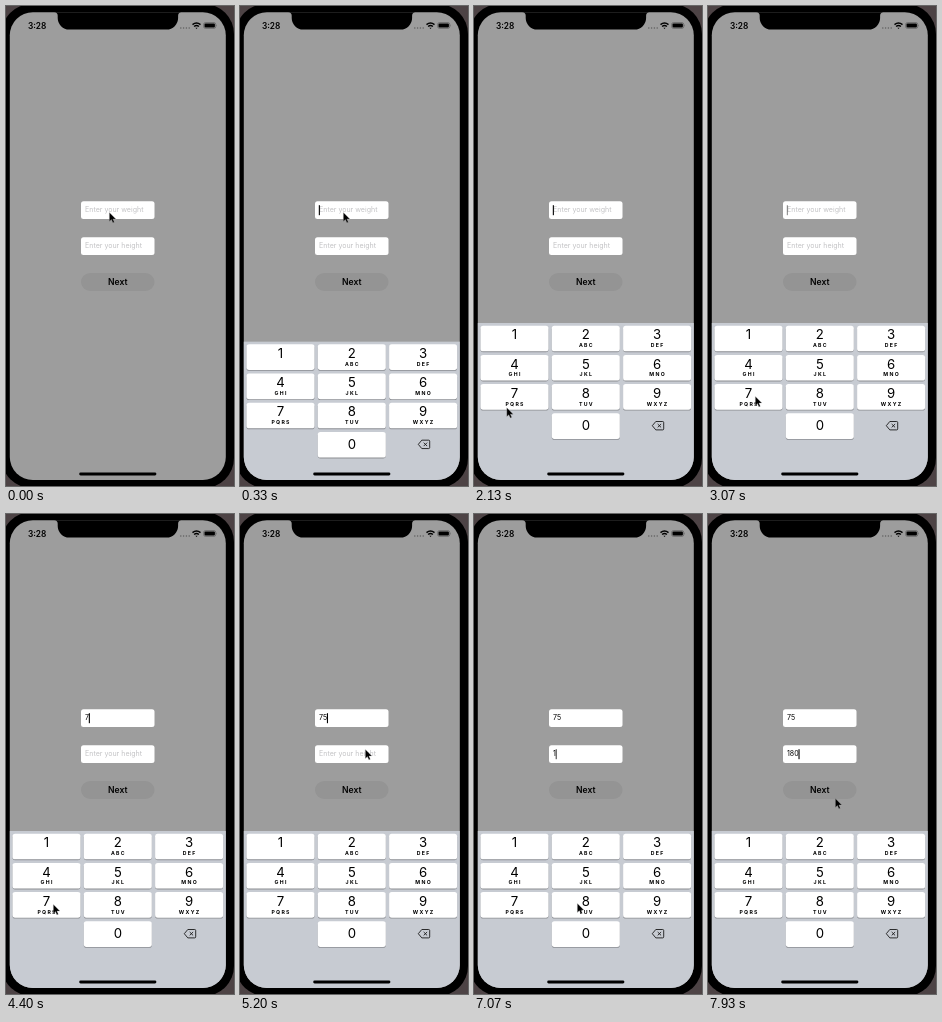
An HTML page that plays this animation: 228 px wide and 480 px high, repeating every 8 s.

```html
<!DOCTYPE html>
<html lang="en">
<head>
<meta charset="utf-8">
<style>
html, body { margin: 0; width: 100%; height: 100%; overflow: hidden; background: #4d4345; }
svg { display: block; width: 228px; height: 480px; font-family: Inter, Roboto, sans-serif; }
.hint { fill: #c3c3c5; }
</style>
</head>
<body>
<svg viewBox="0 0 228 480">
  <defs>
    <clipPath id="screen"><rect x="3.8" y="6.3" width="216" height="467.7" rx="23"/></clipPath>
  </defs>
  <rect x="-4.4" y="-2" width="232.4" height="484" rx="30"/>
  <g clip-path="url(#screen)">
    <rect width="228" height="480" fill="#9d9d9d"/>
    <g id="form" font-size="7.05"></g>
    <rect x="75" y="267" width="73.5" height="18" rx="9" fill="#949494"/>
    <text x="111.8" y="279.1" font-size="8.6" font-weight="600" text-anchor="middle">Next</text>
    <g id="keyboard">
      <rect y="317" width="228" height="165" fill="#c7cbd2"/>
      <g id="keys" text-anchor="middle"></g>
      <path d="M178.3 419.7l3.5-4.2h6.9q1 0 1 1v6.400q0 1-1 1h-6.900zM183.700 418l3.400 3.400m0-3.400l-3.400 3.400" fill="none" stroke="#111" stroke-width=".85" stroke-linejoin="round"/>
    </g>
    <rect x="73.200" y="466.500" width="77.200" height="2.900" rx="1.450"/>
  </g>
  <path d="M48.200 6.300a3.500 3.500 0 0 1 3.500 3.500v2.300a11.500 11.500 0 0 0 11.500 11.500h97.400a11.500 11.500 0 0 0 11.500-11.500v-2.300a3.500 3.500 0 0 1 3.500-3.500z"/>
  <text x="21.900" y="22.600" font-size="8.300" font-weight="600">3:28</text>
  <path d="M174.800 22h10" stroke="#222" stroke-width="1.500" stroke-linecap="round" stroke-dasharray="0 2.800" opacity=".5"/>
  <g fill="none" stroke="#000" stroke-width="1.500">
    <path d="M186.500 18.600q4-3.300 8 0M188.100 20.500q2.400-1.900 4.800 0"/>
    <path d="M189.400 21.700h2.200l-1.100 1.200z" fill="#000" stroke="none"/>
  </g>
  <rect x="197.700" y="16.600" width="12" height="5.800" rx="1.700" fill="none" stroke="#555" stroke-width=".6"/>
  <rect x="198.500" y="17.400" width="10.400" height="4.200" rx="1"/>
  <path d="M210.400 18.600q1 .9 0 1.800z" fill="#555"/>
  <path id="pointer" d="M.4 .6V9.400L2.400 7.600L3.900 10.800L5.300 10.200L3.900 7H6.800Z" stroke="#aaa" stroke-width=".3"/>
</svg>
<script>
const LOOP = 8000, FOCUS = [130, 5330], MOVE = 340, HOLD = 110;
const $ = id => document.getElementById(id);

function add(parent, tag, attrs, text = '') {
  const el = document.createElementNS('http://www.w3.org/2000/svg', tag);
  for (const k in attrs) el.setAttribute(k, attrs[k]);
  el.textContent = text;
  return parent.appendChild(el);
}

// Text fields
const fields = ['weight', 'height'].map((name, i) => {
  const y = 195.3 + i * 36;
  add($('form'), 'rect', { x: 75, y, width: 73.5, height: 17.7, rx: 2.5, fill: '#fff' });
  return {
    hint: add($('form'), 'text', { x: 79, y: y + 11.1, class: 'hint' }, 'Enter your ' + name),
    value: add($('form'), 'text', { x: 79, y: y + 11.1 }),
    caret: add($('form'), 'rect', { y: y + 3.9, width: 1.1, height: 10 })
  };
});

// Number pad
const letters = ' ,ABC,DEF,GHI,JKL,MNO,PQRS,TUV,WXYZ'.split(',');
const keys = Array.from({ length: 10 }, (_, d) => {
  const n = d ? d - 1 : 10, size = { width: 68, height: 25.6, rx: 2.6 };
  const x = 6.5 + n % 3 * 71.3, y = 319.7 + Math.floor(n / 3) * 29.2, mid = x + 34;
  add($('keys'), 'rect', { x, y: y + .9, ...size, fill: '#8b8d92' });
  const face = add($('keys'), 'rect', { x, y, ...size });
  add($('keys'), 'text', { x: mid, y: y + (d ? 13.7 : 17), 'font-size': 13.2 }, d);
  add($('keys'), 'text', {
    x: mid + .6, y: y + 21.5, 'font-size': 5.2, 'font-weight': 700, 'letter-spacing': 1.3
  }, letters[n]);
  return face;
});

// Typed digits: digit, time
const presses = [[7, 4070], [5, 4860], [1, 6470], [8, 7140], [0, 7470]];

// Pointer moves: departure, x, y
const moves = [
  [1190, 72, 343], [1500, 35, 402], [2050, 17, 396], [2730, 47, 390],
  [4400, 108, 362], [4860, 125, 235], [5400, 70, 308], [5900, 27, 337],
  [6730, 103, 389], [7180, 108, 415], [7590, 127, 284]
];

const clamp = v => Math.max(0, Math.min(1, v));
const ease = u => u * u * (3 - 2 * u);

function pointerAt(t) {
  return moves.reduce(([px, py], [leave, x, y]) => {
    const e = ease(clamp((t - leave) / MOVE));
    return [px + (x - px) * e, py + (y - py) * e];
  }, [103, 206]);
}

// Solid after each edit, then a soft one-second blink
function caretAlpha(age) {
  const p = age % 1000;
  return p < 800 ? 1 - clamp((p - 560) / 150) : clamp((p - 900) / 90);
}

function draw(t) {
  // Critically damped spring
  const s = Math.max(0, t - FOCUS[0]) * .0185;
  $('keyboard').setAttribute('transform', `translate(0 ${163 * (1 + s) * Math.exp(-s)})`);
  $('pointer').setAttribute('transform', `translate(${pointerAt(t)})`);

  keys.forEach((key, d) => {
    const down = presses.some(([digit, at]) => digit === d && t >= at && t < at + HOLD);
    key.setAttribute('fill', down ? '#b1b6c0' : '#fff');
  });

  const active = FOCUS.filter(at => at <= t).length - 1;
  fields.forEach((f, i) => {
    const typed = presses.filter(([, at]) => at <= t && (at > FOCUS[1]) === (i === 1));
    f.value.textContent = typed.map(p => p[0]).join('');
    f.hint.setAttribute('opacity', typed.length ? 0 : 1);
    const since = typed.length ? typed[typed.length - 1][1] : FOCUS[i];
    const width = typed.length ? f.value.getComputedTextLength() : 0;
    f.caret.setAttribute('x', 78.8 + width);
    f.caret.setAttribute('opacity', i === active ? caretAlpha(t - since) : 0);
  });
}

const start = performance.now();
(function tick() {
  draw((performance.now() - start) % LOOP);
  requestAnimationFrame(tick);
})();
</script>
</body>
</html>
```
